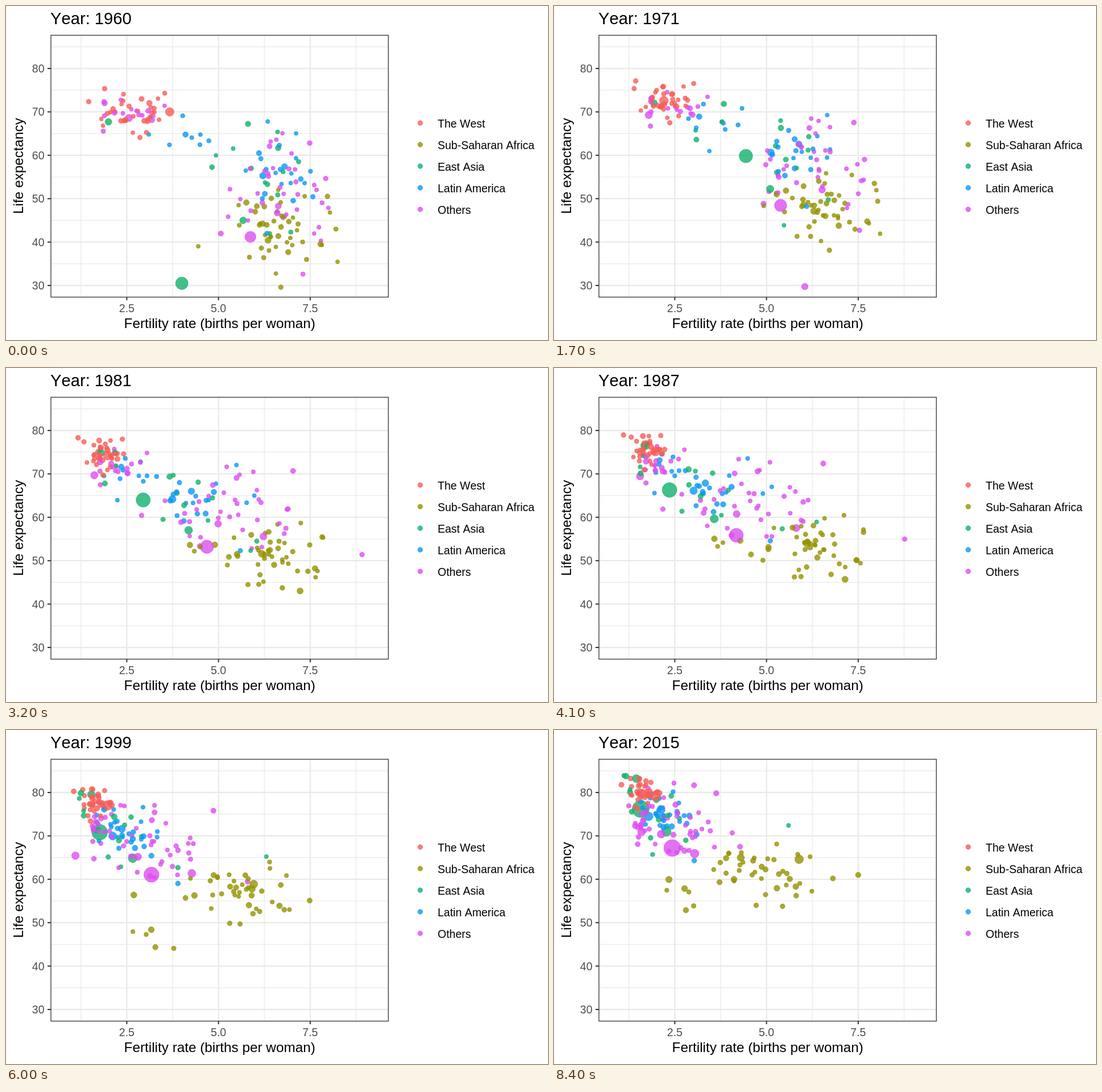
An HTML page that plays this animation: 953 px wide and 588 px high, repeating every 10 s.

```html
<!DOCTYPE html>
<html lang="en">
<head>
<meta charset="utf-8">
<title>Fertility and life expectancy</title>
<style>
  html, body { margin: 0; width: 100%; height: 100%; overflow: hidden; background: #fff; }
  svg { display: block; width: 953px; height: 588px; }
  text { font-family: "Liberation Sans", Arial, Helvetica, sans-serif; font-size: 19.5px; font-kerning: none; }
  .tick { fill: #4d4d4d; }
  .axis { font-size: 24.3px; text-anchor: middle; }
  .title { font-size: 29.2px; }
  .dot { fill-opacity: .8; stroke-opacity: .8; stroke-width: .8; }
</style>
</head>
<body>
<svg id="chart" viewBox="0 0 953 588">
  <clipPath id="panel"><rect x="79" y="51" width="593" height="461"/></clipPath>
  <g id="grid"></g>
  <g id="dots" clip-path="url(#panel)"></g>
  <rect x="79" y="51.5" width="593.3" height="461" fill="none" stroke="#333" stroke-width="1.3"/>
  <g id="marks"></g>
  <text class="title" id="year" x="78" y="32">Year: 1960</text>
  <text class="axis" x="375.7" y="567">Fertility rate (births per woman)</text>
  <text class="axis" transform="translate(30 281.5) rotate(-90)">Life expectancy</text>
</svg>
<script>
const LOOP = 10000, TICK = 100, LAST = 84, START = 1960, SPAN = 55;
const GROUPS = {
  west: ['The West', '#f65e57'],
  africa: ['Sub-Saharan Africa', '#949200'],
  asia: ['East Asia', '#12b26b'],
  latin: ['Latin America', '#0c97f5'],
  other: ['Others', '#dc4ff0']
};
const $ = id => document.getElementById(id);
const px = v => 212.4 + (v - 2.5) * 64.5;
const py = v => 492 - (v - 30) * 7.64;
const mix = (a, b, p) => a + (b - a) * p;

function add(parent, tag, attrs, text) {
  const el = document.createElementNS('http://www.w3.org/2000/svg', tag);
  for (const k in attrs) el.setAttribute(k, attrs[k]);
  if (text) el.textContent = text;
  $(parent).append(el);
  return el;
}

// Axes and legend
function line(parent, x1, y1, x2, y2, stroke, w) {
  add(parent, 'line', { x1, y1, x2, y2, stroke, 'stroke-width': w });
}
const vline = (v, w) => line('grid', px(v), 51, px(v), 512, '#e9e9e9', w);
const hline = (v, w) => line('grid', 79, py(v), 672, py(v), '#e9e9e9', w);
for (let v = 1.25; v < 9; v += 2.5) vline(v, 1.2);
for (let v = 35; v < 90; v += 10) hline(v, 1.2);
for (let v = 2.5; v < 8; v += 2.5) {
  vline(v, 2.3);
  line('marks', px(v), 512, px(v), 518, '#333', 2);
  add('marks', 'text', { class: 'tick', x: px(v), y: 539, 'text-anchor': 'middle' }, v.toFixed(1));
}
for (let v = 30; v < 90; v += 10) {
  hline(v, 2.3);
  line('marks', 73, py(v), 79, py(v), '#333', 2);
  add('marks', 'text', { class: 'tick', x: 67.5, y: py(v) + 7, 'text-anchor': 'end' }, v);
}
Object.values(GROUPS).forEach(([name, color], i) => {
  const y = 206 + i * 38;
  add('marks', 'circle', { class: 'dot', cx: 728.3, cy: y, r: 4.3, fill: color, stroke: color });
  add('marks', 'text', { x: 759, y: y + 7.7 }, name);
});

// Seeded random numbers
let seed = 1960;
function rnd() {
  seed = (seed * 1664525 + 1013904223) % 4294967296;
  return seed / 4294967296;
}
const gauss = () => 2 * (rnd() + rnd() + rnd() - 1.5);

const dots = [];

// A country moves from [births, life] to [births, life]. Births fall along an
// S-curve centred on year mid; a shock [year, births, life, width] bends the path.
function country(group, r0, r1, from, to, { mid = 1985, width = 9, shock, z = rnd() } = {}) {
  dots.push({ color: GROUPS[group][1], r0, r1, from, to, mid, width, shock, z });
}

// Many small countries around two centres, with the standard deviations sd0 and sd1
function cloud(group, n, from, sd0, to, sd1, { mid, vary = 4, width = 7, shock }) {
  for (let i = 0; i < n; i++) {
    const a = [0, 1].map(gauss), r = 3.5 + 1.5 * rnd() ** 2;
    const start = from.map((c, k) => c + sd0[k] * a[k]);
    const end = to.map((c, k) => c + sd1[k] * (.6 * a[k] + .8 * gauss()));
    country(group, r, r * 1.08, start, end, { mid: mid + vary * gauss(), width, shock });
  }
}

country('asia', 11, 15, [6.2, 53.5], [1.57, 76.2], { mid: 1970, shock: [1960, -2.2, -23, 2], z: .15 });
country('asia', 6, 7, [2, 67.7], [1.45, 83.2], { z: .5 });
country('asia', 6, 8.5, [5.67, 45], [2.27, 71], { mid: 1982, z: .4 });
country('asia', 3.6, 3.7, [6.4, 42], [5.6, 72.4], { mid: 2008, width: 4, shock: [1975, -1.4, -10, 6] });
country('asia', 4, 4.4, [6.97, 42.3], [2.8, 69], { mid: 1992, shock: [1977, -1, -32, 1.7] });
cloud('asia', 8, [6.3, 58], [.7, 4], [1.9, 74], [.45, 3], { mid: 1979 });
cloud('asia', 4, [5.3, 62], [.7, 3], [1.25, 82], [.1, 1.2], { mid: 1970 });

country('west', 7.5, 9, [3.67, 70], [1.97, 79.2], { mid: 1965, width: 3, z: .96 });
cloud('west', 34, [2.75, 69.8], [.5, 2.7], [1.65, 80.3], [.22, 2.1], { mid: 1971 });

country('latin', 5.8, 7.6, [6.21, 55.3], [1.79, 74.5], { mid: 1977, z: .2 });
country('latin', 5.2, 6.8, [6.8, 57.4], [2.13, 76], { mid: 1979, width: 7 });
country('latin', 4, 4.4, [6.32, 42], [3.03, 64.3], { mid: 1992 });
cloud('latin', 8, [4, 63.5], [.8, 2.7], [1.9, 77], [.2, 2], { mid: 1975 });
cloud('latin', 20, [6.6, 56.5], [.5, 5], [2.35, 74.5], [.35, 2.5], { mid: 1978, vary: 5 });

country('africa', 5.3, 7.6, [6.35, 40.4], [5.89, 64.6]);
country('africa', 4.8, 6.4, [6.9, 37.7], [4.3, 65], { mid: 2002, width: 5, shock: [1984, .4, -8, 10] });
country('africa', 4.6, 5.7, [6, 47], [2.34, 61.3], { mid: 1980, shock: [2007, 0, -8, 6] });
country('africa', 4, 4.3, [8.2, 43], [3.97, 66], { mid: 1992, width: 7, shock: [1994, 0, -30, 1.7] });
country('africa', 4.2, 4.6, [6.7, 29.6], [6.81, 60.2]);
country('africa', 4, 4.8, [7.4, 36], [7.5, 61]);
country('africa', 3.6, 3.7, [4.38, 38.8], [3.97, 65.9], { shock: [1982, 1.2, 4, 13] });
cloud('africa', 36, [6.6, 43], [.6, 4.8], [4.8, 61.5], [.75, 3.2], { mid: 1996, vary: 5 });
cloud('africa', 5, [6.6, 49], [.6, 3.5], [3, 57], [.4, 5], { mid: 1985, shock: [2004, 0, -13, 7] });

country('other', 9.8, 14.8, [5.87, 41.2], [2.43, 67.2], { mid: 1987, width: 12, z: .45 });
country('other', 6.4, 6.8, [2.56, 68.6], [1.6, 71], { mid: 1964, width: 4, shock: [1999, -.5, -5, 8] });
country('other', 5.4, 7.6, [6.6, 46.7], [3.04, 65.9], { mid: 1996, width: 7 });
country('other', 5.4, 7, [6.63, 48.3], [2.13, 70.4], { mid: 1985, shock: [1971, 0, -25, 1.2] });
country('other', 4, 4.6, [7.3, 32.6], [4.28, 67.5], { mid: 1999, width: 5, shock: [1984, 1.9, 3, 9] });
cloud('other', 16, [2.7, 69], [.42, 2], [1.65, 74], [.25, 2.5], { mid: 1985 });
cloud('other', 36, [6.7, 52.5], [.75, 7], [2.75, 73.3], [.65, 4], { mid: 1986, vary: 6 });

dots.sort((a, b) => a.z - b.z);
for (const d of dots) d.el = add('dots', 'circle', { class: 'dot', fill: d.color, stroke: d.color });

function sCurve(year, mid, width) {
  const s = y => 1 / (1 + Math.exp((mid - y) / width));
  const low = s(START);
  return (s(year) - low) / (s(START + SPAN) - low);
}

function place({ from, to, mid, width, shock }, year) {
  const [when, births, life, wide] = shock || [0, 0, 0, 1];
  const bend = Math.exp(-(((year - when) / wide) ** 2));
  return [
    mix(from[0], to[0], sCurve(year, mid, width)) + births * bend,
    mix(from[1], to[1], ((year - START) / SPAN) ** .8) + life * bend
  ];
}

function draw(step) {
  const p = step / LAST, year = START + SPAN * p;
  $('year').textContent = 'Year: ' + Math.round(year);
  for (const d of dots) {
    const [births, life] = place(d, year);
    d.el.setAttribute('cx', px(births).toFixed(2));
    d.el.setAttribute('cy', py(life).toFixed(2));
    d.el.setAttribute('r', mix(d.r0, d.r1, p).toFixed(2));
  }
}

let shown = -1;
function frame() {
  const step = Math.min(LAST, Math.floor(performance.now() % LOOP / TICK));
  if (step !== shown) draw(shown = step);
  requestAnimationFrame(frame);
}
frame();
</script>
</body>
</html>
```
